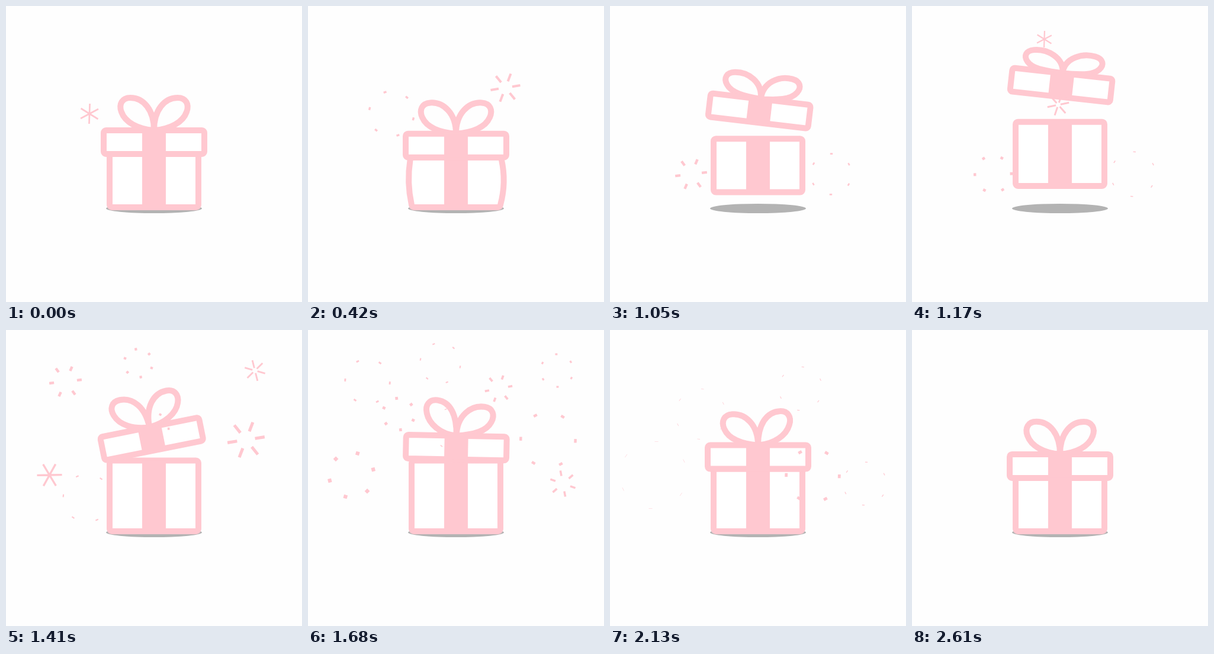
An HTML page with a canvas for the animation above (2.64 s loop, 500 px wide and 500 px high).

```html
<!DOCTYPE html>
<html lang="en">
<head>
<meta charset="utf-8">
<title>Gift box</title>
<style>
  html, body { margin: 0; height: 100%; overflow: hidden; background: #fefefe; }
  canvas { display: block; width: 500px; height: 500px; }
</style>
</head>
<body>
<canvas id="stage" width="500" height="500"></canvas>
<script>
const ctx = document.getElementById('stage').getContext('2d');
const PINK = '#ffc8d0', LOOP = 2640, RAD = Math.PI / 180;

// x, y, radius, start time
const bursts = [
  [141, 182, 46, -240], [333.5, 138, 46, 50], [137, 284, 44, 630], [342.5, 246, 57, 1510],
  [223.5, 56, 38, 930], [247, 167, 38, 845], [100.5, 87, 44, 980], [405.5, 185.5, 57, 1035],
  [73.5, 245, 57, 1170], [373.5, 284, 40, 350], [420.5, 68.5, 36, 1080], [153, 142, 43, 1205],
  [322, 99, 38, 1255], [430.5, 259.5, 38, 1280]
];

const progress = (t, from, to) => Math.min(1, Math.max(0, (t - from) / (to - from)));
const ease = (t, from, to) => { const u = progress(t, from, to); return u * u * (3 - 2 * u); };
const arc = (t, from, to) => { const u = progress(t, from, to); return 4 * u * (1 - u); };

function outline() {
  ctx.fillStyle = '#fff';
  ctx.fill();
  ctx.lineWidth = 10;
  ctx.stroke();
  ctx.fillStyle = PINK;
}

function drawBody(height, squash, lift) {
  const bottom = 340 - lift, top = bottom - height, mid = bottom - height / 2;
  const left = 175 - 5 * squash, right = 325 + 4 * squash;
  ctx.beginPath();
  ctx.moveTo(250, top);
  ctx.arcTo(right, top, right, mid, 4);
  ctx.quadraticCurveTo(325 + 22 * squash, mid, 325, bottom - 4);
  ctx.arcTo(325, bottom, 250, bottom, 4);
  ctx.arcTo(175, bottom, 175, mid, 4);
  ctx.quadraticCurveTo(175 - 18 * squash, mid, left, top + 4);
  ctx.arcTo(left, top, 250, top, 4);
  ctx.closePath();
  outline();
  ctx.fillRect(230, top, 40, height);
}

// One bow loop; bend turns all of it but the knot.
function drawLoop(side, bend) {
  const c = Math.cos(bend * RAD), s = Math.sin(bend * RAD);
  const p = (x, y) => [side * (x * c - y * s), x * s + y * c];
  ctx.moveTo(0, 0);
  ctx.bezierCurveTo(0, -35, ...p(-18, -55), ...p(-40, -55));
  ctx.bezierCurveTo(...p(-54, -55), ...p(-60, -44), ...p(-55, -31));
  ctx.bezierCurveTo(...p(-49, -14), side * -28, -2, 0, 0);
}

function drawBow(t, squash, jump) {
  const droop = 8 * squash + 14 * jump;
  const sway = 7 * Math.min(1, (LOOP - t) / 960) * Math.sin(Math.PI * Math.max(0, t - 1455) / 450);
  ctx.save();
  ctx.translate(0, -20);
  ctx.scale(1, 1 - 0.22 * jump);
  ctx.beginPath();
  drawLoop(1, sway - droop);
  drawLoop(-1, -sway - droop);
  ctx.restore();
  ctx.lineWidth = 10;
  ctx.stroke();
}

function drawLid(t, seat, squash, jump) {
  const gap = 43 * arc(t, 950, 1467) + 2.5 * arc(t, 1467, 1760);
  const tilt = 7.7 * arc(t, 950, 1260) - 11.5 * arc(t, 1260, 1600) + 1.1 * arc(t, 1600, 1760);
  ctx.save();
  ctx.translate(250 + tilt / 3, seat - gap);
  ctx.rotate(tilt * RAD);
  drawBow(t, squash, jump);
  ctx.beginPath();
  ctx.roundRect(-85, -20, 170, 40, 4);
  outline();
  ctx.fillRect(-20, -20, 40, 40);
  ctx.restore();
}

// Six dashes fly out and shorten; every fourth burst spins backwards.
function drawBurst(t, [x, y, radius, start], index) {
  const u = (t - start) / 1000;
  if (u < 0.235 || u >= 1) return;
  const outer = Math.sin(u * Math.PI / 2);
  const length = 0.22 * (1 - u) + 1.7 * Math.max(0, 0.465 - u);
  const inner = Math.max(0, outer - length);
  const angle = index < 8 ? -52 : -25, spin = index % 4 ? 38 : -38;
  ctx.save();
  ctx.translate(x, y);
  ctx.rotate((angle - spin * (1 - outer)) * RAD);
  ctx.lineWidth = radius * Math.min(0.11, 0.16 * outer);
  ctx.beginPath();
  for (let i = 0; i < 6; i++) {
    ctx.moveTo(radius * inner, 0);
    ctx.lineTo(radius * outer, 0);
    ctx.rotate(Math.PI / 3);
  }
  ctx.stroke();
  ctx.restore();
}

function draw() {
  const t = performance.now() % LOOP;
  const height = 90 - 12.5 * ease(t, 0, 900) + 42 * ease(t, 900, 1310) - 29.5 * ease(t, 1650, LOOP);
  const squash = Math.max(0, (90 - height) / 12);
  const jump = arc(t, 950, 1390), lift = 36 * jump;

  ctx.fillStyle = '#fefefe';
  ctx.fillRect(0, 0, 500, 500);
  ctx.fillStyle = '#b3b3b3';
  ctx.beginPath();
  ctx.ellipse(250, 342, 81, 8, 0, 0, 2 * Math.PI);
  ctx.fill();

  ctx.strokeStyle = PINK;
  drawBody(height, squash, lift);
  drawLid(t, 320 - lift - height, squash, jump);
  bursts.forEach((burst, index) => drawBurst(t, burst, index));
  requestAnimationFrame(draw);
}
draw();
</script>
</body>
</html>
```
